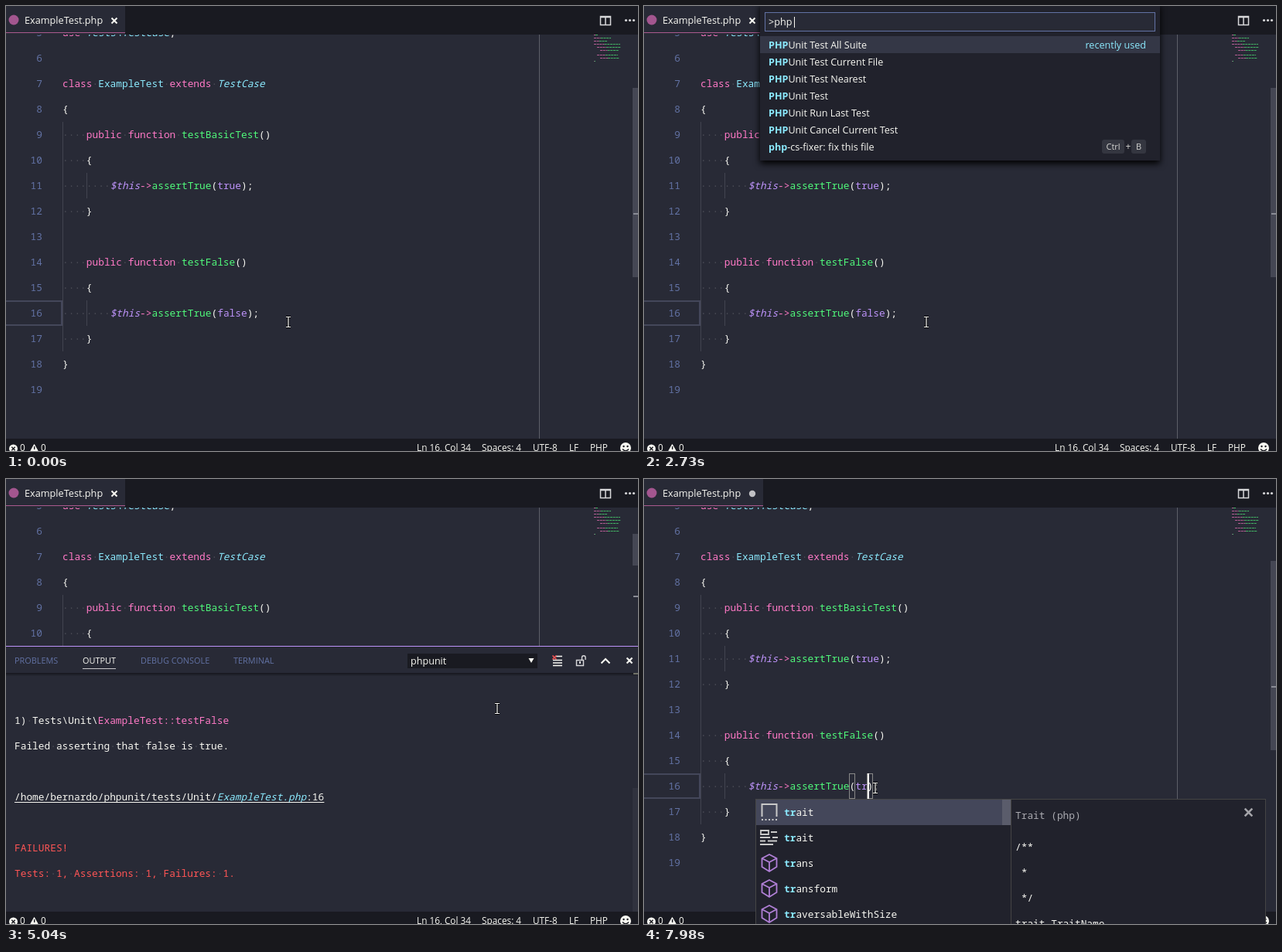
These frames come from a looping animation (817 by 576 pixels, 8000 ms). An HTML page:

```html
<!DOCTYPE html>
<html lang="en">
<head>
<meta charset="utf-8">
<title>Editor test run</title>
<style>
html, body { margin: 0; width: 100%; height: 100%; overflow: hidden; background: #282a36; }
svg { display: block; }
text { white-space: pre; font-family: "Open Sans", "Noto Sans", sans-serif; }
.code { font-family: "Noto Sans Mono", "DejaVu Sans Mono", monospace; font-size: 12.83px; }
</style>
</head>
<body>
<svg id="stage" width="817" height="576" viewBox="0 0 817 576"></svg>
<script>
const LOOP = 8000, STEP = 70, CW = 7.7, LH = 33;
const BG = '#282a36', DARK = '#191a21', POPUP = '#21222c', FG = '#f8f8f2', GREY = '#44475a',
  PINK = '#ff79c6', CYAN = '#8be9fd', GREEN = '#50fa7b', PURPLE = '#bd93f9', RED = '#ff5555', MUTED = '#6272a4';
const STYLES = {
  w: FG, p: PINK, c: CYAN, g: GREEN, v: PURPLE, r: RED, d: '#aaaab0',
  I: CYAN + '" font-style="italic', V: PURPLE + '" font-style="italic',
  b: CYAN + '" font-weight="700'
};

const rect = (x, y, w, h, fill, extra = '') =>
  `<rect x="${x}" y="${y}" width="${w}" height="${h}" fill="${fill}" ${extra}/>`;
const path = (d, stroke, width = 1, fill = 'none') =>
  `<path d="${d}" stroke="${stroke}" stroke-width="${width}" fill="${fill}"/>`;
const circle = (x, y, r, fill, extra = '') => `<circle cx="${x}" cy="${y}" r="${r}" fill="${fill}" ${extra}/>`;
const text = (x, y, s, fill = FG, size = 12.6, anchor = 'start') =>
  `<text x="${x}" y="${y}" font-size="${size}" fill="${fill}" text-anchor="${anchor}">${s}</text>`;
const cross = (x, y, r, color, width = 2) =>
  path(`M${x - r} ${y - r}l${2 * r} ${2 * r}m0 ${-2 * r}l${-2 * r} ${2 * r}`, color, width);
const between = (t, a, b) => t >= a && t < b;

// Parts are split by "|"; the first character of each part names its style.
function code(x, y, parts, dots = true) {
  const spans = parts.split('|').map(p => {
    let s = p.slice(1);
    if (dots) s = s.replace(/ /g, '<tspan fill="#fff" fill-opacity=".17">·</tspan>');
    return `<tspan fill="${STYLES[p[0]]}">${s}</tspan>`;
  });
  return `<text class="code" x="${x}" y="${y}">${spans.join('')}</text>`;
}

const lineTop = n => 381 + (n - 16) * LH;
const colX = c => 73 + (c - 1) * CW;
const caret = c => rect(Math.round(colX(c)), 381, 2, 33, FG);

function minimap() {
  const rows = [[0, 37, 5], [0, 41, 22], [0, 45, 17], [0, 49, 34], [4, 53, 31],
    [8, 57, 24], [4, 63, 27], [8, 67, 25], [0, 71, 2]];
  return rows.map(([x, y, w]) => {
    const a = w * .4;
    return `<g opacity=".65" stroke-dasharray="3 .7">${path(`M${760 + x} ${y + .5}h${a}`, PINK)}` +
      `${path(`M${760 + x + a} ${y + .5}h${w - a}`, GREEN)}</g>`;
  }).join('');
}

function editor(t, panel) {
  const arg = t < 7700 ? 'false' : t < 7910 ? 't' : 'tr';
  const lines = {
    5: 'puse |ITests\\TestCase|w;',
    7: 'pclass |cExampleTest |pextends |ITestCase',
    8: 'w{',
    9: 'w    |ppublic function |gtestBasicTest|w()',
    10: 'w    {',
    11: 'w        |V$this|p->|gassertTrue|w(|vtrue|w);',
    12: 'w    }',
    14: 'w    |ppublic function |gtestFalse|w()',
    15: 'w    {',
    16: `w        |V$this|p->|gassertTrue|w(|v${arg}|w);`,
    17: 'w    }',
    18: 'w}'
  };
  let s = rect(0, 0, 817, 576, BG);
  s += rect(689, 37, 1, 523, '#5d5f69');
  s += rect(73, 150, 1, 297, '#424450') + rect(104, 216, 1, 33, '#424450') + rect(104, 381, 1, 33, '#424450');
  s += rect(-3, 382, 75, 31, 'none', `stroke="${GREY}" stroke-width="2"`);
  if (between(t, 7070, 7700)) s += rect(colX(27), 381, 5 * CW, 33, GREY);
  for (let n = 5; n <= 19; n++) {
    const y = lineTop(n) + 21;
    s += `<text class="code" x="47" y="${y}" fill="${MUTED}" text-anchor="end">${n}</text>`;
    if (lines[n]) s += code(73, y, lines[n]);
  }
  if (t >= 7700) {
    for (const c of [26, 27 + arg.length])
      s += rect(Math.round(colX(c)) - .5, 381.5, 7, 32, 'none', 'stroke="#888"');
  }
  if (between(t, 280, 770) || between(t, 3500, 3640) || between(t, 6020, 6520)) s += caret(34);
  if (between(t, 6860, 7070)) s += caret(30);
  if (between(t, 7070, 7560)) s += caret(32);
  if (t >= 7700) s += caret(27 + arg.length);
  s += panel ? rect(810, 71, 7, 41, '#454754') + rect(811, 151, 6, 2, '#8a8c96')
    : rect(810, 106, 7, 245, '#454754') + rect(811, 268, 6, 2, '#8a8c96');
  return s + minimap();
}

function tabs(t) {
  let s = rect(0, 0, 817, 37, DARK) + rect(0, 0, 154, 37, BG);
  s += `<g opacity=".6">${path('M0 34.5h154', PINK, 1)}</g>`;
  s += circle(10, 18, 6.5, '#a3568f') + text(24, 23, 'ExampleTest.php', FG, 12.7);
  s += t < 7700 ? cross(140, 19, 3.5, FG) : circle(140, 19, 4.2, '#c0c0c4');
  s += path('M768.5 13.5h13v11h-13zM768 14.5h14M775 13v12', '#d8d8da', 1.5);
  return s + [801.5, 806.5, 811.5].map(x => circle(x, 18.5, 1.6, '#d8d8da')).join('');
}

function statusBar(t) {
  const pos = t < 6860 ? 'Col 34' : t < 7070 ? 'Col 30' : t < 7700 ? 'Col 32 (5 selected)'
    : t < 7910 ? 'Col 28' : 'Col 29';
  let s = rect(0, 560, 817, 16, DARK);
  s += circle(9.5, 573, 5.5, FG) + cross(9.5, 573, 2.2, DARK, 1.5) + text(18, 576, '0', FG, 11.8);
  s += path('M36.5 567.5l5 9h-10z', FG, 1, FG) + rect(36, 570, 1.4, 4, DARK) + text(45, 576, '0', FG, 11.8);
  s += text(601, 576, 'Ln 16, ' + pos, FG, 11.8, 'end');
  for (const [x, label] of [[615, 'Spaces: 4'], [681, 'UTF-8'], [728, 'LF'], [755, 'PHP']])
    s += text(x, 576, label, FG, 11.8);
  return s + circle(801, 572, 7, FG) + circle(798.5, 570, 1.2, DARK) + circle(803.5, 570, 1.2, DARK) +
    path('M797 573.5q4 4.5 8 0', DARK, 1.4);
}

const UNIT = ['All Suite', 'Current File', 'Nearest', '', 'Run Last', 'Cancel'];
const unitRow = s => 'PHPUnit ' + (s === 'Run Last' ? 'Run Last Test'
  : s === 'Cancel' ? 'Cancel Current Test' : ('Test ' + s).trim());
const FIXER = 'php-cs-fixer: fix this file';
const KEYS = {
  'Files: Open Folder...': [[532, 29, 'Ctrl'], [565, 0, '+'], [570, 17, 'K'], [590, 31, 'Ctrl'], [624, 0, '+'], [629, 20, 'O']],
  'File: Close Workspace': [[572, 30, 'Ctrl'], [606, 0, '+'], [610, 18, 'K'], [631, 18, 'F']],
  [FIXER]: [[592, 29, 'Ctrl'], [626, 0, '+'], [630, 19, 'B']]
};
const TYPED = [[910, ''], [2380, 'p'], [2520, 'ph'], [2590, 'php'], [2730, 'php '],
  [2870, 'php n'], [2940, 'php ne'], [3080, 'php nea']];
const INPUT_X = [168, 176, 184, 191, 194, 202, 209, 216];

function paletteRows(query) {
  const unit = UNIT.map(unitRow);
  if (!query) return [...unit.slice(0, 3), 'Files: Open Folder...', 'File: Close Workspace',
    unit[3], unit[4], unit[5], 'Preferences: File Icon Theme'];
  if (query === 'p') return [...unit, 'Preferences: File Icon Theme', FIXER, 'Preferences: Color Theme'];
  return query.length > 4 ? [unit[2]] : [...unit, FIXER];
}

function palette(t) {
  const query = TYPED.filter(k => k[0] <= t).pop()[1];
  const [first, second = ''] = query.split(' ');
  const bold = s => `<tspan fill="${CYAN}" font-weight="700">${s}</tspan>`;
  const mark = s => {
    if (!first) return s;
    const n = first.length, i = second ? s.indexOf('Nearest') : s.length, m = i + second.length;
    return bold(s.slice(0, n)) + s.slice(n, i) + bold(s.slice(i, m)) + s.slice(m);
  };
  const rows = paletteRows(query);
  let s = rect(150, -4, 517, 50 + 22 * rows.length, POPUP, 'style="filter:drop-shadow(0 4px 4px #000)"');
  s += rect(156.5, 8.5, 504, 24, BG, `stroke="${MUTED}"`) + text(161, 25, '>' + query);
  if (!between(t, 1400, 1960)) s += rect(INPUT_X[query.length], 14, 1, 14, FG);
  s += rect(150, 39, 517, 22, '#343746') + text(649, 55, 'recently used', CYAN, 12.6, 'end');
  rows.forEach((row, i) => {
    const y = 55 + 22 * i;
    s += text(161, y, mark(row));
    for (const [x, w, label] of KEYS[row] || []) {
      if (w) s += rect(x, y - 14, w, 18, '#343640', 'rx="3"');
      s += text(x + w / 2, y - 1, label, '#d5d5d2', w ? 11 : 12, 'middle');
    }
  });
  return s;
}

function panelView(t) {
  let s = rect(0, 216, 817, 344, BG) + rect(0, 216, 817, 1, PURPLE);
  for (const [x, label] of [[11, 'PROBLEMS'], [99, 'OUTPUT'], [174, 'DEBUG CONSOLE'], [294, 'TERMINAL']])
    s += text(x, 239, label, label === 'OUTPUT' ? FG : MUTED, 10.9);
  s += rect(99, 245, 43, 1, '#c9c9cc');
  s += rect(519, 226, 168, 19, DARK) + text(523, 240, 'phpunit') + path('M675.5 232h7l-3.5 6z', 'none', 0, FG);
  s += path('M711 229.5h8M707 234.5h12M707 238h12M707 241.5h12', FG, 1.6) + cross(709, 231, 2.5, RED, 1.5);
  s += path('M737.5 234.5h9v7h-9zM744.5 234v-3a2.3 2.3 0 0 1 4.6 0v3', '#d8d8da', 1.4) + rect(741, 236, 2, 3, '#d8d8da');
  s += path('M769.5 238.5l5.5-5.5l5.5 5.5', FG, 2) + cross(806, 235, 3.5, FG, 2.2);
  for (let i = 0; i < 4; i++) s += rect(0, 251 + i, 817, 1, '#000', `fill-opacity="${.4 - i * .1}"`);
  s += rect(811, 251, 6, 2, '#6f7066');
  if (t < 3920) return s;
  if (t >= 4620) s += rect(810, 400, 7, 160, '#30323e');
  const tint = t >= 3990, bad = tint ? 'r' : 'w';
  const out = [
    `w1) Tests\\Unit\\|${tint ? 'p' : 'w'}ExampleTest::testFalse`,
    'wFailed asserting that false is true.', '',
    `w/home/bernardo/phpunit/tests/Unit/|${tint ? 'I' : 'w'}ExampleTest.php|w:16`, '',
    bad + 'FAILURES!', bad + 'Tests: 1, Assertions: 1, Failures: 1.'
  ];
  out.forEach((line, i) => { if (line) s += code(11, 317 + LH * i, line); });
  if (t >= 4550) s += rect(11, 418, 52 * CW, 1, FG);
  return s;
}

function suggestIcon(i, y) {
  if (i === 0) return path(`M152.5 ${y + 6}v-16h19v16`, '#c8c8c8', 2) +
    `<g stroke-dasharray="2 2.5">${path(`M152 ${y + 10}h21`, '#c8c8c8', 2)}</g>`;
  if (i === 1) return path(`M151 ${y - 9}h10v5h-10zM164 ${y - 7}h8M150 ${y}h13M166 ${y}h7M150 ${y + 4.5}h7M160 ${y + 4.5}h12M150 ${y + 9}h17`, '#c8c8c8', 1.8);
  return path(`M162 ${y - 11}l9.5 5v11l-9.5 6l-9.5-6v-11zM152.5 ${y - 6}l9.5 5l9.5-5M162 ${y - 1}v12`, '#b180d7', 1.8);
}

function suggest(t) {
  const n = t < 7910 ? 1 : 2;
  let s = rect(144.5, 414.5, 330, 170, POPUP, 'stroke="#454545"');
  s += rect(145, 415, 329, 33, GREY) + rect(463, 415, 11, 33, '#5a5c6b');
  ['trait', 'trait', 'trans', 'transform', 'traversableWithSize'].forEach((word, i) => {
    const y = 431 + LH * i;
    s += suggestIcon(i, y) + code(181, y + 5, `b${word.slice(0, n)}|w${word.slice(n)}`);
  });
  if (t < 7980) return s;
  s += rect(474.5, 414.5, 329, 170, POPUP, 'stroke="#454545"') + cross(781.5, 431.5, 4.8, '#a5a5aa', 2.6);
  s += code(480, 440, 'dTrait (php)', false);
  ['/**', ' *', ' */', 'trait TraitName'].forEach((line, i) => { s += code(480, 481 + LH * i, 'w' + line, false); });
  return s;
}

const MOUSE = [[0, 365, 409], [4480, 365, 409], [5320, 730, 258], [5950, 811, 232],
  [6090, 805, 238], [6860, 299, 400], [LOOP, 299, 400]];

function mouse(t, panel) {
  const k = Math.floor(t / STEP) * STEP;
  const i = MOUSE.findIndex((m, j) => k < MOUSE[j + 1][0]);
  const [a, b] = [MOUSE[i], MOUSE[i + 1]];
  const u = (k - a[0]) / (b[0] - a[0]), e = u * u * (3 - 2 * u);
  const x = Math.round(a[1] + (b[1] - a[1]) * e), y = Math.round(a[2] + (b[2] - a[2]) * e);
  const header = panel && y < 251;
  let shape;
  if (header && x > 797) {
    shape = path('M-1 1q1-2 2 0v5l6 2q2 1 1 4l-1 3h-8l-4-5q-1-2 1-2l3 2z', '#000', 1, '#fff');
  } else if (header || x > 745) {
    shape = path('M0 0v14l3.3-3l2.3 5l2.2-1l-2.2-5h4.4z', '#000', 1, '#fff');
  } else {
    const beam = 'M-3-6.5h2.5l.5.5l.5-.5h2.5M0-6v12M-3 6.5h2.5l.5-.5l.5.5h2.5';
    shape = path(beam, '#000', 3) + path(beam, '#fff', 1.2);
  }
  return `<g transform="translate(${x} ${y})">${shape}</g>`;
}

function scene(t) {
  const panel = between(t, 3640, 6020);
  let s = editor(t, panel) + tabs(t);
  if (panel) s += panelView(t);
  s += statusBar(t);
  if (between(t, 910, 3500)) s += palette(t);
  if (t >= 7840) s += suggest(t);
  return s + mouse(t, panel);
}

const stage = document.getElementById('stage');
let shown = '', start;
function frame(now) {
  start ??= now;
  const next = scene((now - start) % LOOP);
  if (next !== shown) stage.innerHTML = shown = next;
  requestAnimationFrame(frame);
}
requestAnimationFrame(frame);
</script>
</body>
</html>
```
